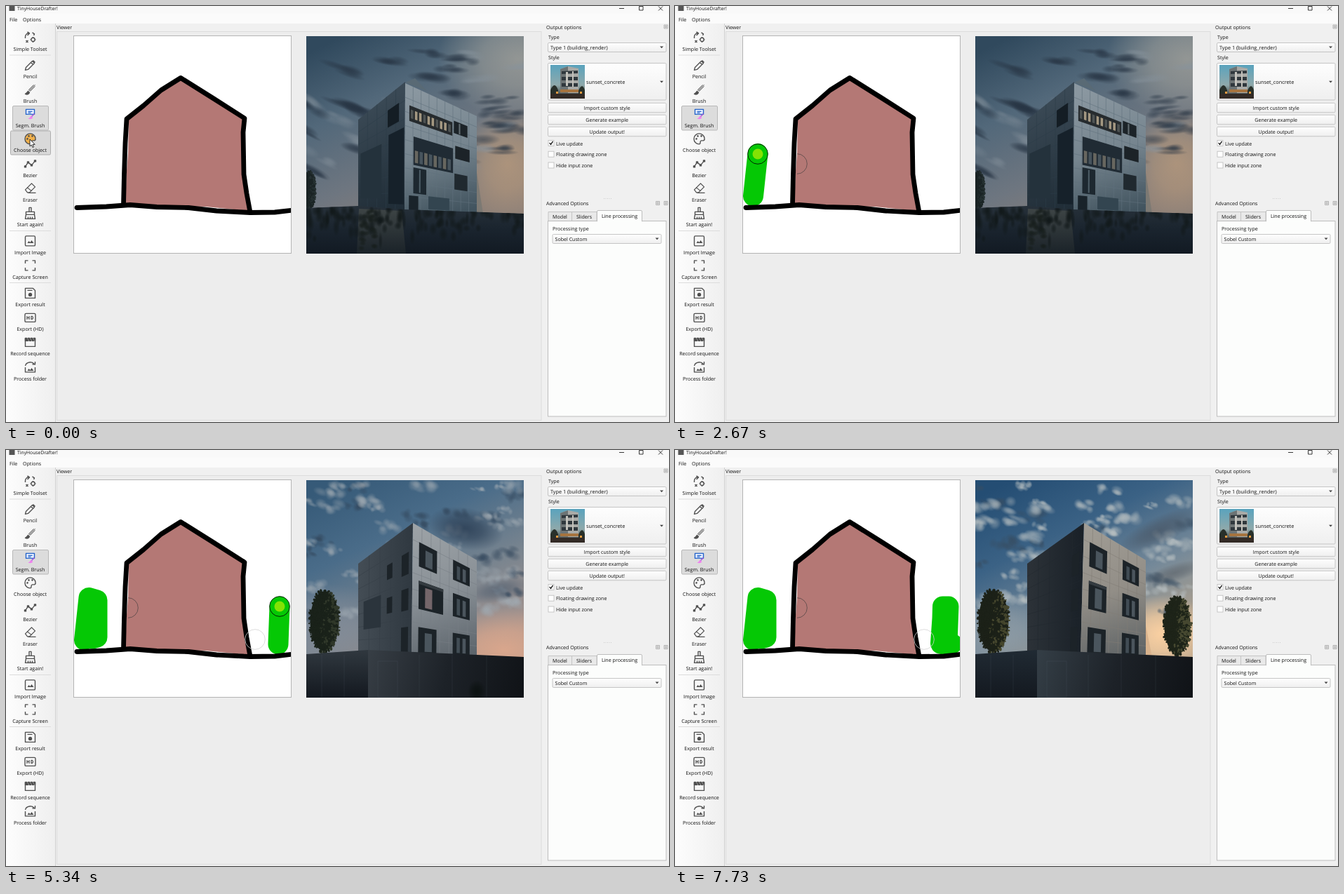
An HTML page with a canvas that plays this animation: 945x593 px, repeating every 8000 ms.

```html
<!DOCTYPE html>
<html lang="en">
<head>
<meta charset="utf-8">
<title>Sketch to building</title>
<style>
  html, body { margin: 0; width: 100%; height: 100%; overflow: hidden; background: #f0f0f0; }
  svg, canvas { position: absolute; left: 0; top: 0; }
  canvas { left: 428px; top: 43px; }
  svg { width: 945px; height: 593px; overflow: hidden; }
  text { font: 7.1px "Open Sans", "Noto Sans", sans-serif; fill: #111; text-rendering: geometricPrecision; }
  .mid { text-anchor: middle; }
  .ico { fill: none; stroke: #505050; stroke-width: 1.4; stroke-linejoin: round; }
  .ico .f { fill: #505050; }
  .box { fill: url(#btn); stroke: #b9b9b9; stroke-width: .8; }
  .line { fill: none; stroke: #000; stroke-width: 6.8; stroke-linecap: round; stroke-linejoin: round; }
  .paint { fill: none; stroke: #05c805; stroke-width: 29; stroke-linecap: round; stroke-linejoin: round; }
  .ring { fill: none; stroke: #000; stroke-opacity: .82; }
  .big { fill: none; stroke: #161616; stroke-width: 5; }
  .big .f { fill: #161616; stroke: none; }
</style>
</head>
<body>
<svg id="ui" viewBox="0 0 945 593">
  <defs>
    <linearGradient id="btn" x2="0" y2="1"><stop stop-color="#fefefe"/><stop offset="1" stop-color="#efefef"/></linearGradient>
    <linearGradient id="side"><stop stop-color="#fdfdfd"/><stop offset="1" stop-color="#efefef"/></linearGradient>
    <linearGradient id="dusk" x2="0" y2="1"><stop stop-color="#5aa3bd"/><stop offset=".6" stop-color="#8fa9ab"/><stop offset="1" stop-color="#2b2724"/></linearGradient>
    <clipPath id="page"><rect x="96.500" y="43" width="309.500" height="309"/></clipPath>
  </defs>

  <rect width="945" height="25" fill="#fbfbfb"/>
  <rect id="bar" width="945" height="11" fill="#f9f9f9"/>
  <rect x="4.500" width="8" height="7" fill="#555"/>
  <text id="name" x="16" y="6" style="font-size:6.8px">TinyHouseDrafter!</text>
  <path d="M874 3.500h7M902.500.500h5.500v5.500h-5.500zM930 .500l6 6m0-6l-6 6" fill="none" stroke="#222" stroke-width=".9"/>
  <text x="5" y="21.500">File</text><text x="24" y="21.500">Options</text>

  <rect y="25" width="70" height="568" fill="url(#side)"/>
  <path d="M70.500 25V593" stroke="#cfcfcf"/>
  <rect x="72.500" y="36.500" width="690.500" height="554" fill="#ededed" stroke="#dcdcdc"/>
  <text x="72" y="33">Viewer</text>
  <path d="M5 70H64M5 320.500H64M5 394.500H64" stroke="#dcdcdc"/>
  <rect x="9.500" y="142.500" width="51" height="34.500" rx="1.500" fill="#dcdcdc" stroke="#b8b8b8"/>
  <rect id="hot" x="6.500" y="178" width="57" height="34" rx="1.500" fill="#d9d9d9" stroke="#adadad"/>
  <g id="tools"></g>

  <rect x="96.500" y="42.500" width="310" height="310" fill="#fff" stroke="#b4b4b4"/>
  <g clip-path="url(#page)">
    <path d="M175 162L221 121 249 104 296 132 338 161 337 200 340 245 346 292 325 290 285 286 215 285 170 282 172 235 174 210z" fill="#b47875"/>
    <path id="paint0" class="paint"/><path id="paint1" class="paint"/>
    <path class="line" d="M167.500 283L168.500 240 170 195 172 161 196 142 221 120 249 102.500 296 132 340 160 338 180 339 240 343 267 348 294"/>
    <path class="line" d="M101 287.500L143 286 177 283.500 215 286.500 260 287.500 300 292 348 294.500 383 294 410 291"/>
    <path id="trace0" d="M174 210.700A14.300 14.300 0 0 1 174 239.300" fill="none" stroke="#584848" stroke-width=".8"/>
    <circle id="trace1" cx="355" cy="270" r="14.300" fill="none" stroke="#d4d4d4" stroke-width=".8"/>
  </g>
  <g id="ring"><circle id="dot" r="7.500" fill="#84e205"/><circle class="ring" r="14.300"/></g>

  <g id="panel"></g>
</svg>

<svg id="over" viewBox="0 0 945 593">
  <g id="dialog">
    <rect x="349" y="252" width="231" height="236" rx="14" fill="#000" opacity=".16" style="filter:blur(9px)"/>
    <rect x="354" y="241" width="221.500" height="228" rx="5" fill="#f3f3f3" stroke="#bbb" stroke-width=".7"/>
    <path d="M354 257V246a5 5 0 0 1 5-5h211.500a5 5 0 0 1 5 5V257z" fill="#fff"/>
    <rect x="360" y="246" width="7" height="6" fill="#555"/>
    <text x="371.500" y="252">Select a label</text>
    <path d="M563 246l5 5m0-5l-5 5" stroke="#222" stroke-width=".9"/>
    <g id="labels"></g>
  </g>
  <path id="arrow" d="M0 0V10L2.300 8 4 11.600 5.600 10.900 4 7.400H7.200z" fill="#fff" stroke="#000" stroke-width=".8"/>
</svg>

<script>
const $ = id => document.getElementById(id);
const LOOP = 8000;

// ---------- toolbar ----------
const tools = [
  ['Simple Toolset', 63.5, '<path d="M-7 1V-1A5 5 0 0 1-1-6M-4-8L-1-6-4-3M-6 4L-3 7M-6 7L-3 4"/><circle cx="4" cy="3" r="2.600"/><path d="M4-1V0M4 6V7M0 3H1M7 3H8M3-7L6-5 5-3"/>'],
  ['Pencil', 103, '<path d="M-7 7L-6 3 3-6 6-3-3 6zM1-4L4-1M4-7L7-4"/>'],
  ['Brush', 138, '<path d="M7-7L-1 1M5-7L-2 0 0 2 7-5" stroke-width="1"/><path class="f" d="M-3 2L-1 4Q-3 8-7 6-5 5-3 2z"/>'],
  ['Segm. Brush', 173, '<rect x="-6" y="-7" width="12" height="7" fill="#e8f0ff" stroke="#2463c9"/><path d="M-3-4H3M-3-2H1" stroke="#2463c9"/><path d="M6-1L2 3" stroke="#9b55d8"/><path d="M1 2L4 5Q1 8-3 6 0 5 1 2z" fill="#ef80ee" stroke="none"/>'],
  ['Choose object', 208, '<path id="pal" d="M0-7.500A7.500 7.500 0 1 0 0 7.500C3 7.500 0 3 3 2.500H6Q8 2 7.500-1A7.500 7.500 0 0 0 0-7.500z"/><circle class="f" cx="-4" cy="0" r=".6"/><circle class="f" cx="-2" cy="-4" r=".6"/><circle class="f" cx="3" cy="-4" r=".6"/>'],
  ['Bezier', 243.5, '<path d="M-7 4L-3-2 2 2 7-4"/><path class="f" d="M-8 3h2v2h-2zM-4-3h2v2h-2zM1 1h2v2h-2zM6-5h2v2h-2z"/>'],
  ['Eraser', 278.5, '<path d="M-7 2L2-7 7-2-1 6H-4zM-3 6.500H8M-4-1L2 4" stroke-width="1.200"/>'],
  ['Start again!', 314, '<path d="M-1.500-2V-8H1.500V-2M-6 2V-2H6V2zM-6 2L-7 8H7L6 2M-3 8V5M0 8V5M3 8V5"/>'],
  ['Import Image', 353.5, '<rect x="-7" y="-7" width="14" height="14" rx="1.500"/><path class="f" d="M-4 3L-2 0 0 2 2-1 5 3z" stroke="none"/>'],
  ['Capture Screen', 388.5, '<path d="M-7-3V-7H-3M3-7H7V-3M7 3V7H3M-3 7H-7V3"/>'],
  ['Export result', 428, '<path d="M-7-7H4L7-4V7H-7zM-4-4H3"/><circle class="f" cy="2" r="2"/>'],
  ['Export (HD)', 463, '<rect x="-7.500" y="-6" width="15" height="12" rx="1.500"/><path d="M-4.500-2.500V2.500M-1.500-2.500V2.500M-4.500 0H-1.500M1.500-2V2H3Q5 0 3-2z" stroke-width="1.200"/>'],
  ['Record sequence', 498, '<path d="M-7-6V6H7V-6"/><path class="f" d="M-7-6H-5L-3-2H-7zM-3-6H-1L1-2H-1zM1-6H3L5-2H3zM5-6H7V-2z"/>'],
  ['Process folder', 533.5, '<path d="M-7-2A7 6 0 0 1 6-4M7-8V-4H3M-7 0V7H7V0"/><path class="f" d="M-4 5L-2 2 0 4 2 1 5 5z" stroke="none"/>']
];
$('tools').innerHTML = tools.map(([label, y, art]) =>
  `<g class="ico" transform="translate(34.500 ${y - 18.6})">${art}</g><text class="mid" x="34.500" y="${y}">${label}</text>`).join('');

// ---------- options panel ----------
const text = (x, y, s, more = '') => `<text x="${x}" y="${y}" ${more}>${s}</text>`;
const box = (x, y, w, h) => `<rect class="box" x="${x}" y="${y}" width="${w}" height="${h}" rx="1.500"/>`;
const caret = (x, y) => `<path d="M${x - 2.5} ${y - 1.2}h5l-2.500 2.800z" fill="#444"/>`;
const button = (y, s) => box(772.5, y, 168.5, 13.5) + text(856.7, y + 9.3, s, 'class="mid"');
const check = (y, s, on) => `<rect x="773" y="${y - 7}" width="8" height="8" fill="#fff" stroke="#bbb" stroke-width=".8"/>`
  + (on ? `<path d="M774.700 ${y - 3.2}l1.800 2.200 3-4.600" fill="none" stroke="#111" stroke-width="1.300"/>` : '') + text(784, y + .2, s);
const dock = (x, y) => `<path d="M${x - 2.5} ${y - 2.5}h5v5h-5zM${x - 1} ${y - 1}h2v2h-2z" fill="none" stroke="#999" stroke-width=".7"/>`;
const thumb = `<g transform="translate(776 84)"><rect width="49" height="48" fill="url(#dusk)"/>
  <path d="M14 6L25 2 40 5V40H14z" fill="#a9aaa7"/><path d="M14 6L25 2V40H14z" fill="#6d7475"/>
  <path d="M16 9L39 8V12L16 13zM16 17H39V22H16zM16 26H39V31H16z" fill="#30383d"/><path d="M22 10h3v20h-3zM31 9h2v22h-2z" fill="#c3c2bc"/>
  <path d="M0 36Q6 22 11 36V48H0zM40 37Q45 24 49 36V48H40z" fill="#28302a"/><path d="M14 35H40V39H14z" fill="#a6743f"/>
  <path d="M8 38h3v3h-3zM42 38h3v3h-3z" fill="#e59a3e"/><path d="M0 41H49V48H0z" fill="#332b26"/></g>`;
$('panel').innerHTML =
  text(770, 33, 'Output options') + dock(940.5, 29.5) + text(773, 47, 'Type')
  + box(772.5, 52.5, 168.5, 13) + text(776, 61.5, 'Type 1 (building_render)', 'style="font-size:7.25px"') + caret(934.5, 58.7)
  + text(773, 76, 'Style') + box(772.5, 81.5, 168.5, 52.5) + thumb
  + text(827, 110.5, 'sunset_concrete', 'style="font-size:7.3px"') + caret(934.5, 108)
  + button(138.3, 'Import custom style') + button(155.3, 'Generate example') + button(172.3, 'Update output!')
  + check(198.4, 'Live update', 1) + check(214.2, 'Floating drawing zone') + check(230, 'Hide input zone')
  + '<path d="M852 274.500h11" stroke="#ccc" stroke-dasharray="1 1.500"/>'
  + text(770, 284, 'Advanced Options') + dock(929, 281) + dock(940.5, 281)
  + '<rect x="772.500" y="306.500" width="168.500" height="278.500" fill="#fcfdfc" stroke="#bdbdbd"/>'
  + '<path d="M773 306V293.500H842V306M806.500 294V306" fill="#e9e9e9" stroke="#c4c4c4"/>'
  + '<path d="M842.500 307.200V293Q842.500 291.500 844 291.500H905Q906.500 291.500 906.500 293V307.200" fill="#fcfdfc" stroke="#bdbdbd"/>'
  + text(789.5, 302.5, 'Model', 'class="mid"') + text(824, 302.5, 'Sliders', 'class="mid"') + text(874.5, 302, 'Line processing', 'class="mid"')
  + text(779, 320, 'Processing type') + box(779, 325.5, 155, 13) + text(782.5, 334.5, 'Sobel Custom') + caret(928, 331.6);

// ---------- label dialog ----------
const labels = [
  '<path d="M-24 23V-7H-9V-21H10V0H24V23H7V11H-7V23z"/><path class="f" d="M-17-1h5v5h-5zM-17 9h5v5h-5zM-3-13h6v5h-6zM-3-3h6v5h-6zM14 6h5v5h-5z"/>',
  '<path d="M-14 17A11 11 0 0 1-15-5 15 15 0 0 1 13-7 12 12 0 0 1 14 17z"/>',
  '<path class="f" d="M0-25L17-3H9L22 14H4V25H-4V14H-22L-9-3H-17z"/>',
  '<path d="M-20-22V22M0-22V-13M0-5V5M0 13V22M20-22V4M11 17H27M19 9V25"/>',
  '<rect x="-21" y="-21" width="42" height="42" rx="3"/><path d="M0-21V21M-21 0H21"/>',
  '<path class="f" d="M-2 20Q-4 8-24 7-20 20-2 20zM2 20Q4 8 24 7 20 20 2 20zM-3 10Q-7-2-23-7-20 8-3 10zM3 8Q4-8 22-15 23 3 3 8zM-1 5Q-12-6-8-21 4-12-1 5z"/>',
  '<circle class="f" cx="0" cy="-19" r="6"/><path d="M-18-22Q-16-8-5-8H6Q12-6 13 7M-4-8V25M6-8V25M-4 9H6" stroke-width="6"/>',
  '<path d="M-15 22V-22H15V22M-24 22H24"/><circle class="f" cx="7" cy="2" r="3.500"/>',
  [-13, 0, 13].map(y => `<path d="M-25 ${y + 3}Q-19 ${y + 3}-15 ${y}T-5 ${y}Q0 ${y + 6} 5 ${y}T15 ${y}Q19 ${y + 3} 25 ${y + 3}"/>`).join('')
];
$('labels').innerHTML = labels.map((art, i) => {
  const x = 394.5 + i % 3 * 70, y = 298.6 + Math.floor(i / 3) * 67;
  return `<g class="big" transform="translate(${x} ${y})"><rect x="-33" y="-32" width="66" height="64" rx="2" fill="#fafafa" stroke="#ccc" stroke-width=".8"/>${art}</g>`;
}).join('');

// ---------- rendered buildings ----------
const random = seed => () => (seed = seed * 16807 % 2147483647) / 2147483647;

function puff(g, x, y, rx, ry, turn, rgb, a) {
  const fill = g.createRadialGradient(0, 0, 0, 0, 0, 1);
  fill.addColorStop(0, `rgba(${rgb},${a})`);
  fill.addColorStop(.45, `rgba(${rgb},${a * .7})`);
  fill.addColorStop(1, `rgba(${rgb},0)`);
  g.save();
  g.translate(x, y); g.rotate(turn); g.scale(rx, ry);
  g.fillStyle = fill;
  g.fillRect(-1, -1, 2, 2);
  g.restore();
}
function poly(g, pts, fill) {
  g.beginPath();
  pts.forEach(p => g.lineTo(...p));
  g.fillStyle = fill;
  g.fill();
}
function fade(g, x0, y0, x1, y1, ...stops) {
  const f = g.createLinearGradient(x0, y0, x1, y1);
  stops.forEach((c, i) => f.addColorStop(i / (stops.length - 1), c));
  return f;
}
// A wall seen in perspective: corners clockwise from top left.
function face(g, q, fill, cols, rows, joint) {
  const mix = (a, b, k) => a + (b - a) * k;
  const at = (u, v) => [0, 1].map(i => mix(mix(q[0][i], q[1][i], u), mix(q[3][i], q[2][i], u), v));
  const rule = (a, b) => { g.beginPath(); g.moveTo(...a); g.lineTo(...b); g.stroke(); };
  poly(g, q, fill);
  g.strokeStyle = joint; g.lineWidth = .6;
  for (let i = 1; i < cols; i++) rule(at(i / cols, 0), at(i / cols, 1));
  for (let i = 1; i < rows; i++) rule(at(0, i / rows), at(1, i / rows));
  return (u0, v0, u1, v1, c) => poly(g, [at(u0, v0), at(u1, v0), at(u1, v1), at(u0, v1)], c);
}
function tree(g, x, y, rx, ry, seed, dark, light) {
  const r = random(seed);
  g.fillStyle = dark;
  g.fillRect(x - 2, y, 4, ry + 2);
  g.beginPath(); g.ellipse(x, y, rx * .93, ry * .95, 0, 0, 7); g.fill();
  for (let i = 0; i < 500; i++) {
    const a = r() * 6.283, d = Math.sqrt(r()), s = 1 + r() * 1.6;
    g.fillStyle = d * Math.cos(a) + r() * 1.4 > 1 ? light : dark;
    g.beginPath();
    g.ellipse(x + Math.cos(a) * d * rx, y + Math.sin(a) * d * ry, s, s * .7, a, 0, 7);
    g.fill();
  }
}
function photo(draw) {
  const c = document.createElement('canvas');
  c.width = c.height = 310;
  $('over').before(c);
  const g = c.getContext('2d');
  g.translate(-428, -43);
  draw(g);
  return c;
}
function sky(g, ...stops) {
  g.fillStyle = fade(g, 480, 43, 610, 310, ...stops);
  g.fillRect(428, 43, 310, 310);
}
function clumps(g, seed, n, rgb, a) {
  const r = random(seed);
  for (let i = 0; i < n; i++) {
    const x = 428 + r() * 310, y = 50 + r() * 190, s = 7 + r() * 8;
    for (let j = 0; j < 8; j++)
      puff(g, x + (r() - .5) * s * 2.4, y + (r() - .5) * s, s * (.4 + r() * .5), s * (.3 + r() * .35), .35, rgb, a);
  }
}
const GLASS = '#1c2328';

function dusk(g) {
  sky(g, '#30495d', '#52687a', '#6e7680', '#8d8078');
  puff(g, 730, 75, 115, 85, 0, '160,160,154', .8);
  puff(g, 715, 225, 70, 80, 0, '179,151,124', .85);
  const r = random(41);
  for (let i = 0; i < 42; i++) {
    const x = 425 + r() * 310, y = 55 + r() * 185, tilt = .5 - (x - 428) / 500 + (r() - .5) * .2;
    for (let j = 0; j < 4; j++) {
      const k = (r() - .5) * 40;
      puff(g, x + k, y + k * tilt + (r() - .5) * 9, 10 + r() * 17, 3 + r() * 5, tilt, i % 3 ? '38,51,66' : '135,147,157', i % 3 ? .5 : .3);
    }
  }
  tree(g, 433, 262, 8, 27, 5, '#1b2425', '#253031');
  poly(g, [[671, 238], [680, 296], [668, 296]], '#7c7973');
  const left = face(g, [[502, 162], [569, 108], [568, 292], [502, 287]], fade(g, 502, 150, 568, 290, '#3a4955', '#1f2c36'), 5, 7, '#2d3d48');
  left(.63, .13, .87, .28, '#141d24'); left(.65, .35, .98, .95, '#16212a'); left(.05, .4, .5, .9, '#24323c');
  poly(g, [[569, 109], [583, 103], [600, 121]], '#596a75');
  const right = face(g, [[569, 110], [671, 157], [671, 297], [568, 291]], fade(g, 590, 120, 640, 295, '#8a97a0', '#76858f', '#42545f'), 9, 9, '#60717d');
  right(.06, .16, .66, .285, '#262b2e');
  for (let i = 0; i < 10; i++) right(.08 + i * .058, .19, .115 + i * .058, .26, i % 3 ? '#a39781' : '#4f5454');
  right(.68, .14, .87, .255, GLASS);
  right(.12, .4, .67, .63, '#202b34');
  for (let i = 0; i < 8; i++) right(.14 + i * .065, .51, .185 + i * .065, .61, i % 2 ? '#47545d' : '#67665f');
  right(.7, .37, .9, .49, GLASS); right(.12, .65, .3, .86, '#1d2830'); right(.69, .63, .87, .78, '#20292f');
  right(.06, .88, .19, 1, '#19232a'); right(.33, .87, .62, .98, '#334550');
  right(.75, .15, .77, .25, '#626d72'); right(.2, .66, .22, .85, '#4d5d66');

  g.save();
  g.beginPath();
  [[428, 288], [502, 285], [568, 290], [738, 296], [738, 353], [428, 353]].forEach(p => g.lineTo(...p));
  g.clip();
  g.fillStyle = fade(g, 0, 285, 0, 352, '#27313a', '#1a242e', '#121a23');
  g.fillRect(428, 280, 310, 73);
  poly(g, [[503, 289], [564, 292], [570, 353], [500, 353]], fade(g, 0, 290, 0, 352, '#3d4445', '#1b2329'));
  for (let i = 0; i < 120; i++) {
    const d = r() * r();
    puff(g, 428 + r() * 310, 290 + d * 50, 3 + r() * 4, 5 + r() * 9, 0, '16,23,24', .6);
  }
  for (let i = 0; i < 30; i++) puff(g, 505 + r() * 22, 292 + r() * 55, 5, 4, 0, '22,29,27', .7);
  g.restore();
}

function block(g, lit) {
  const left = face(g, [[502, 162], [lit ? 583 : 580, 104], [578, 293], [502, 289]],
    lit ? fade(g, 502, 0, 580, 0, '#2c3238', '#1a2128') : fade(g, 502, 0, 580, 0, '#444d55', '#2f3840'), 5, 7, lit ? '#22292f' : '#363f47');
  left(.8, .2, .93, .37, GLASS); left(.8, .48, .93, .65, GLASS); left(.8, .78, .93, .98, GLASS);
  if (!lit) { left(.53, .21, .63, .34, GLASS); left(.53, .5, .63, .64, GLASS); left(.1, .45, .42, .75, '#2b343c'); }
  const right = face(g, [[lit ? 583 : 580, 104], [671, 157], [671, 297], [578, 292]],
    lit ? fade(g, 590, 110, 650, 295, '#a09c94', '#928e87', '#5f6466') : fade(g, 590, 110, 650, 295, '#9ca2a6', '#899096', '#5d656c'), 7, 8, lit ? '#827d76' : '#777f85');
  [[.12, .31], [.42, .64], [.78, .99]].forEach(([v0, v1], i) => {
    const wide = i == 1 && !lit ? .48 : .38;
    right(.1, v0, wide, v1, GLASS); right(.63, v0, .89, v1 - .01, GLASS);
    right(.2, v0 + .04, .31, v1 - .02, i == 1 && !lit ? '#74666a' : '#4a555d');
    right(.69, v0 + .04, .74, v1 - .03, '#414c54'); right(.78, v0 + .04, .83, v1 - .03, '#4b555d');
    if (i == 1) right(.1, v0, wide, v0 + .025, '#343b40');
  });
}
function wall(g, left, right) {
  poly(g, [[428, 291], [516, 285], [516, 353], [428, 353]], fade(g, 0, 285, 0, 352, left, '#141920'));
  poly(g, [[516, 285], [738, 295], [738, 353], [516, 353]], fade(g, 516, 290, 738, 350, right, '#1d2228', '#101317'));
  g.strokeStyle = 'rgba(110,120,128,.2)'; g.lineWidth = .7;
  for (const x of [450, 482, 589, 636, 685]) { g.beginPath(); g.moveTo(x, 292); g.lineTo(x, 352); g.stroke(); }
  g.strokeRect(530, 301, 28, 51);
}
function evening(g) {
  sky(g, '#365a78', '#4a6c89', '#78848f', '#a5938d');
  puff(g, 710, 285, 110, 60, 0, '222,168,140', .9);
  puff(g, 450, 250, 100, 60, 0, '142,147,158', .6);
  clumps(g, 19, 16, '50,70,91', .4);
  clumps(g, 77, 50, '160,170,178', .36);
  puff(g, 655, 112, 55, 30, .2, '43,62,84', .85);
  puff(g, 702, 200, 45, 17, -.2, '69,86,105', .6);
  tree(g, 454, 244, 22, 45, 9, '#1a221a', '#30382a');
  block(g, false);
  wall(g, '#30383f', '#373e45');
  puff(g, 671, 344, 13, 16, 0, '11,17,16', .9);
}
function bright(g) {
  sky(g, '#244d73', '#3b6285', '#758999', '#b6a48d');
  puff(g, 694, 262, 75, 55, 0, '250,208,162', 1);
  puff(g, 455, 255, 80, 55, 0, '155,165,171', .7);
  clumps(g, 61, 15, '55,77,98', .4);
  clumps(g, 123, 52, '182,190,192', .42);
  puff(g, 690, 115, 65, 20, -.45, '70,83,98', .7);
  puff(g, 712, 175, 45, 13, -.3, '91,98,105', .65);
  tree(g, 454, 244, 23, 46, 9, '#1c2118', '#45462d');
  tree(g, 716, 250, 20, 43, 15, '#1e2419', '#474931');
  poly(g, [[671, 250], [680, 295], [669, 295]], '#d9b38d');
  block(g, true);
  wall(g, '#202a33', '#343e46');
}
const photos = [[dusk, 0], [evening, 4260], [bright, 6930]].map(([draw, from]) => ({ from, el: photo(draw) }));

// ---------- motion ----------
// [start, x, y, pointer]: a = arrow, o = brush ring, p = brush pressed
const poses = [
  [0, 34, 190, 'a'], [260, 130, 205, 'a'], [530, 305, 252, 'a'], [790, 472, 316, 'a'], [1060, 539, 316, 'a'],
  [1330, 174, 224.5, 'o'], [1600, 120, 234, 'o'], [1870, 123, 247, 'o'], [2140, 116, 277, 'o'],
  [2410, 111.5, 271, 'p'], [2670, 118, 211, 'p'], [2930, 130, 255, 'p'], [3200, 123, 268, 'p'], [3470, 115, 249, 'p'],
  [3740, 240, 262, 'o'], [4000, 355, 270, 'o'], [4260, 381, 291, 'o'], [4530, 389, 280, 'o'], [4800, 387, 283, 'o'],
  [5070, 388, 278, 'p'], [5340, 390, 223, 'p'], [5610, 381, 240, 'p'], [5870, 383, 277, 'p'], [6140, 395, 276, 'p'],
  [6410, 340, 240, 'o'], [6670, 283, 208, 'o'], [6930, 285, 208, 'o'], [7200, 230, 200, 'o'], [7460, 175.5, 192.5, 'o'],
  [7730, 0, 0, '']
];
const strokes = [
  [[2410, 111.5, 271], [2670, 118, 210.5], [2930, 130, 214], [2930, 130, 255], [3200, 130, 267], [3200, 123, 269], [3470, 115, 249]],
  [[5070, 388, 277], [5340, 390, 223], [5610, 381.5, 223], [5610, 381, 240], [5870, 378.5, 276], [5870, 383, 277], [6140, 395, 276]]
];
const show = (el, on) => el.style.display = on ? '' : 'none';
const between = (t, a, b) => t >= a && t < b;

function render(t) {
  const [, x, y, pointer] = poses.filter(p => p[0] <= t).pop();
  const place = `translate(${x} ${y})`;
  show($('arrow'), pointer == 'a');
  show($('ring'), pointer == 'o' || pointer == 'p');
  show($('dot'), pointer == 'p');
  $('arrow').setAttribute('transform', place);
  $('ring').setAttribute('transform', place);

  strokes.forEach((pts, i) => {
    const done = pts.filter(p => p[0] <= t).map(p => p[1] + ' ' + p[2]);
    $('paint' + i).setAttribute('d', done.length ? `M${done[0]}L${done.join(' ')}` : '');
  });
  show($('trace0'), t >= 1600);
  show($('trace1'), t >= 4260);

  const modal = between(t, 260, 1330);
  show($('hot'), t < 260);
  $('pal').style.fill = t < 260 ? '#efb04c' : 'none';
  $('bar').setAttribute('fill', modal ? '#f3f3f3' : '#f9f9f9');
  $('name').style.fill = modal ? '#999' : '#111';

  const scale = t < 530 ? .97 : t < 1330 ? 1 : .932;
  show($('dialog'), between(t, 260, 1600));
  $('dialog').setAttribute('opacity', t < 530 ? .9 : t < 1330 ? 1 : .055);
  $('dialog').setAttribute('transform', `translate(464.500 355) scale(${scale}) translate(-464.500 -355)`);

  photos.forEach(({ from, el }, i) => show(el, between(t, from, i < 2 ? photos[i + 1].from : LOOP)));
}
let start;
function tick(now) {
  start ??= now;
  render((now - start) % LOOP);
  requestAnimationFrame(tick);
}
render(0);
requestAnimationFrame(tick);
</script>
</body>
</html>
```
